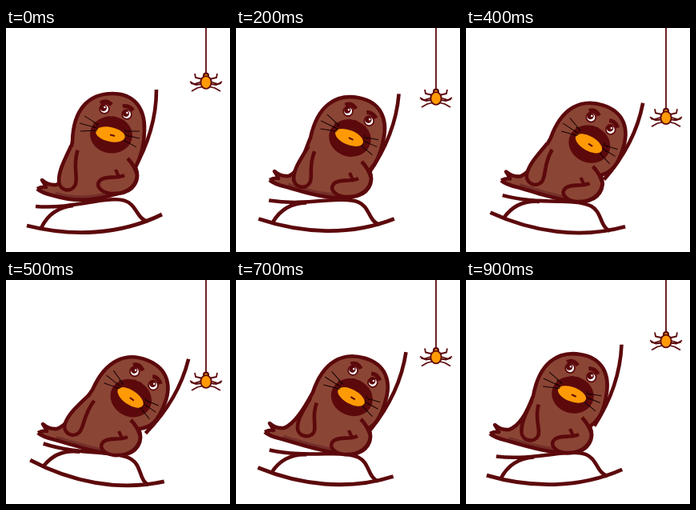
Recreate the animation shown at these times as an HTML page with a canvas. Size 280 by 280 pixels, loop 1 s.

```html
<!DOCTYPE html>
<html lang="en">
<head>
<meta charset="utf-8">
<title>Rocking walrus</title>
<style>
html, body { margin: 0; width: 100%; height: 100%; overflow: hidden; background: #fff; }
canvas { display: block; width: 100vw; height: 100vh; }
</style>
</head>
<body>
<canvas id="stage"></canvas>
<script>
const LOOP = 1000, STEP = 100, SIZE = 280;
const INK = '#5c090c', SKIN = '#8b4535', SHADE = '#74302a', ORANGE = '#ff9a05';
const canvas = document.getElementById('stage');
const ctx = canvas.getContext('2d');

// time, chair x y turn, head x y turn, tail x y, arm top x y, arm end x y, foot x y, spider y
const POSES = [
  [0,   110.5, 240, 0,     131, 133, 0,    39, 201,  86, 150, 75, 203,  0, 0,   68],
  [200, 113, 238.5, 4.7,   142, 137, 10.8, 42, 190,  95, 151, 80, 199,  5, 4,   88],
  [300, 115.5, 240.5, 7.6, 152, 142, 13.5, 48, 190, 102, 150, 86, 198,  9, 8,   97.5],
  [500, 114, 238.5, 13.8,  156, 147, 22.5, 40, 191, 108, 147, 78, 193,  4, 12, 127],
  [600, 113, 239.5, 11.1,  150, 147, 19.5, 38, 192, 101, 149, 83, 194,  5, 11, 106],
  [800, 111, 240.5, 5.7,   139, 145, 14.4, 34, 188,  94, 152, 88, 197,  3, 11,  87],
  [900, 110.5, 240.5, 2.3, 133, 143, 9,    30, 192,  87, 153, 79, 201, -7, 9,   76.5]
];

function poseAt(t) {
  let i = POSES.length - 1;
  while (POSES[i][0] > t) i--;
  const a = POSES[i], b = POSES[(i + 1) % POSES.length];
  const k = (t - a[0]) / ((b[0] || LOOP) - a[0]);
  return a.map((v, j) => v + (b[j] - v) * k);
}

// Maps rest coordinates around (cx, cy) to a moved and turned place
function mover(cx, cy, x, y, deg) {
  const c = Math.cos(deg * Math.PI / 180), s = Math.sin(deg * Math.PI / 180);
  return (px, py) => [x + (px - cx) * c - (py - cy) * s, y + (px - cx) * s + (py - cy) * c];
}

function stroke(path, width, color = INK) {
  ctx.lineWidth = width;
  ctx.strokeStyle = color;
  ctx.stroke(new Path2D(path));
}

function blob(x, y, rx, ry, fill, turn = 0) {
  ctx.beginPath();
  ctx.ellipse(x, y, rx, ry, turn, 0, Math.PI * 2);
  ctx.fillStyle = fill;
  ctx.fill();
}

function within(cx, cy, x, y, deg, draw) {
  ctx.save();
  ctx.translate(x, y);
  ctx.rotate(deg * Math.PI / 180);
  ctx.translate(-cx, -cy);
  draw();
  ctx.restore();
}

function drawChair() {
  stroke('M188 77C188 112 178 146 158 180', 4.6);
  stroke('M26 247C82 261 142 259 195 233', 4.8);
  stroke('M44 250C52 233 65 224 84 222', 4.6);
  stroke('M37 223C64 225 86 221 110 217C150 210 155 217 163 229C168 237 171 240 177 242', 4.6);
}

function drawBody(head, tail, foot) {
  const p = new Path2D(), belly = new Path2D();
  const curve = (path, a, b, c) => path.bezierCurveTo(...a, ...b, ...c);
  const end = foot(140, 207), low = foot(115, 0);
  low[1] = 214 + (end[1] - 207) * 0.3;
  p.moveTo(...tail(0, 0));
  p.quadraticCurveTo(...tail(6, -3), ...tail(11, -2));
  p.quadraticCurveTo(...tail(9, -7), ...tail(6, -11));
  p.quadraticCurveTo(...tail(14, -4), ...tail(24, -5));
  curve(p, tail(37, -10), head(78, 166), head(83, 142));
  curve(p, head(84, 101), head(104, 82), head(133, 82));
  curve(p, head(160, 82), head(174, 100), head(173, 128));
  curve(p, head(173, 145), head(170, 158), foot(162, 174));
  curve(p, foot(168, 190), foot(160, 205), end);
  curve(p, low, tail(52, 18), tail(22, 9));
  p.quadraticCurveTo(...tail(5, 5), ...tail(0, 0));
  belly.moveTo(...end);
  curve(belly, low, tail(52, 18), tail(22, 9));
  ctx.fillStyle = SKIN;
  ctx.fill(p);
  ctx.save();
  ctx.clip(p);
  ctx.lineWidth = 11;
  ctx.strokeStyle = SHADE;
  ctx.stroke(belly);
  ctx.restore();
  ctx.lineWidth = 4.6;
  ctx.strokeStyle = INK;
  ctx.stroke(p);
}

function drawArm(x, y, ex, ey) {
  const len = Math.hypot(ex - x, ey - y);
  const turn = Math.atan2(ey - y, ex - x) * 180 / Math.PI - 90;
  within(0, 0, x, y, turn, () => {
    const path = `M-5 -2C-10 ${len * 0.35} -14 ${len * 0.6} -11 ${len * 0.83}` +
      `C-8 ${len * 1.04} 7 ${len * 1.04} 10 ${len * 0.83}C12 ${len * 0.66} 2 ${len * 0.45} 4 2`;
    ctx.fillStyle = SKIN;
    ctx.fill(new Path2D(path));
    stroke(path, 4.6);
  });
}

function drawFoot() {
  const path = 'M152 163Q161 172 164 184C163 200 148 208 131 207C117 205 111 196 118 190C126 184 138 189 148 184';
  ctx.fillStyle = SKIN;
  ctx.fill(new Path2D(path));
  stroke(path, 4.6);
  stroke('M137 177L142 188', 4.2);
}

function drawEye(x, y) {
  blob(x, y, 6.8, 6.8, INK);
  blob(x, y, 5, 5, '#fff');
  blob(x - 1.2, y - 1.3, 4.2, 4.2, INK);
  blob(x + 0.4, y - 2, 1.2, 1.2, '#fff');
}

function drawFace() {
  stroke('M124 114Q126 109 131 112Q137 109 139 115', 1.2);
  blob(131.5, 133.5, 26.5, 23, INK, 0.1);
  blob(130.5, 133, 18.5, 9, ORANGE, 0.21);
  stroke('M130 133.4L136 135', 2);
  drawEye(123, 101);
  drawEye(151, 108);
  stroke('M118 94Q125 89 132 96', 5);
  stroke('M146 98Q153 96 159 103', 5);
  stroke('M98 110L116 121M92 119L114 125M93 129L114 128M148 129L167 129M149 134L167 138M147 140L163 149', 1, '#100');
  for (let i = 0; i < 5; i++) {
    blob(110 + i % 2 * 4, 119 + i * 2.4, 0.8, 0.8, '#100');
    blob(149 + i % 2 * 4, 127 + i * 2.8, 0.8, 0.8, '#100');
  }
}

function drawSpider(y) {
  stroke(`M250 0V${y - 9}`, 1.8);
  ctx.save();
  ctx.translate(250, y);
  for (const side of [-1, 1]) {
    ctx.save();
    ctx.scale(side, 1);
    stroke('M4 -4L13 -6L14 -11M5 -1L15 2L20 -1M5 2L13 3L19 1M3 5L11 7L18 11', 1.8);
    ctx.restore();
  }
  blob(0, -8.5, 4, 4, INK);
  blob(0, -8.5, 1.8, 1.8, ORANGE);
  blob(0, 0, 7.6, 8.8, INK);
  blob(0, 0, 5.7, 6.9, ORANGE);
  ctx.restore();
}

function draw(t) {
  const [, cx, cy, ca, hx, hy, ha, tx, ty, ax, ay, ex, ey, fx, fy, sy] = poseAt(t);
  const scale = canvas.width / SIZE;
  ctx.setTransform(scale, 0, 0, scale, 0, 0);
  ctx.fillStyle = '#fff';
  ctx.fillRect(0, 0, SIZE, SIZE);
  ctx.lineJoin = 'round';
  within(110.5, 240, cx, cy, ca, drawChair);
  drawBody(
    mover(131, 133, hx, hy, ha),
    mover(0, 0, tx, ty, 0),
    mover(0, 0, fx, fy, 0)
  );
  drawArm(ax, ay, ex, ey);
  within(0, 0, fx, fy, 0, drawFoot);
  within(131, 133, hx, hy, ha, drawFace);
  drawSpider(sy);
}

function resize() {
  canvas.width = canvas.height = Math.round(SIZE * (window.devicePixelRatio || 1));
}

const start = performance.now();
function tick() {
  const t = Math.max(0, performance.now() - start) % LOOP;
  draw(Math.floor(t / STEP) * STEP);
  requestAnimationFrame(tick);
}

resize();
tick();
</script>
</body>
</html>
```
